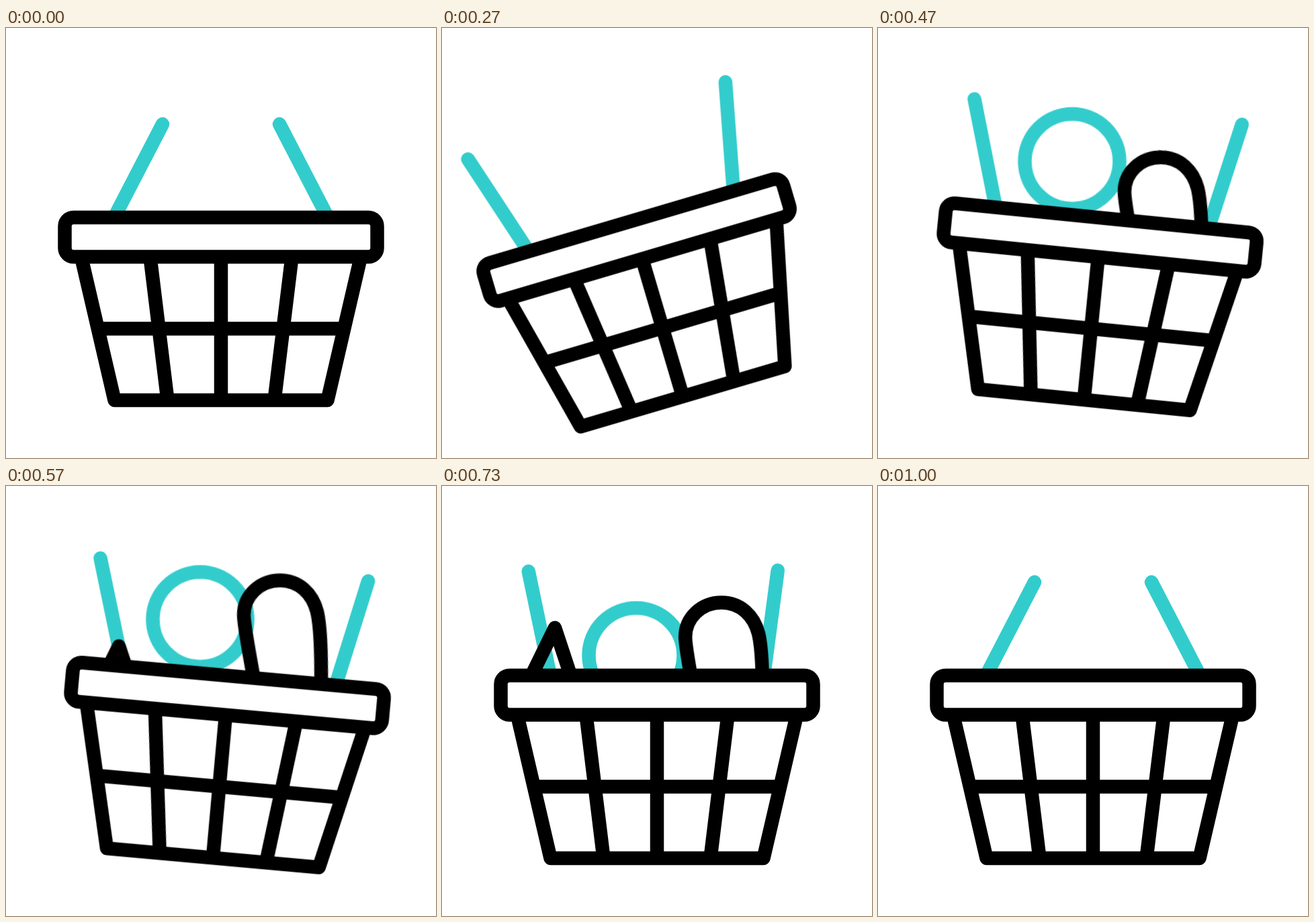
An HTML page without scripts that plays this animation: 640 px wide and 640 px high, repeating every 1.67 s.

```html
<!DOCTYPE html>
<html lang="en">
<head>
<meta charset="utf-8">
<title>Shopping basket</title>
<style>
  html, body { margin: 0; width: 100%; height: 100%; overflow: hidden; background: #fff; }
  svg { display: block; width: 100vw; height: 100vh; }

  .line { fill: none; stroke: #000; stroke-width: 20.5; stroke-linecap: round; stroke-linejoin: round; }
  .teal { stroke: #3cc; }

  .tilt, .level, .handle, .item {
    animation: 1670ms cubic-bezier(.333, 0, .667, 1) infinite;
  }
  .tilt, .level { transform-origin: 320px 418.5px; }
  .tilt { animation-name: tilt; }
  .level { animation-name: level; }
  .left { animation-name: left; }
  .right { animation-name: right; }
  .ball { animation-name: ball; }
  .pear { animation-name: pear; }
  .cone { animation-name: cone; }

  @keyframes tilt {
    0%, 41.6%, 100% { transform: rotate(0deg); }
    14.97% { transform: rotate(-16.9deg); }
    30.4% { transform: rotate(7deg); }
  }
  /* cancels the tilt so the goods move upright */
  @keyframes level {
    0%, 41.6%, 100% { transform: rotate(0deg); }
    14.97% { transform: rotate(16.9deg); }
    30.4% { transform: rotate(-7deg); }
  }
  @keyframes left {
    0%, 3.4%, 59.1%, 100% { d: path("M161 282L233 143"); }
    15.1%, 39.34% { d: path("M161 282L113.4 124.7"); }
  }
  @keyframes right {
    0%, 3.4%, 59.1%, 100% { d: path("M479 282L407 143"); }
    15.1%, 39.34% { d: path("M479 282L513.4 123"); }
  }
  @keyframes ball {
    0%, 14.13% { transform: translate(13px, 236px); }
    27.43%, 39.34% { transform: translate(0, 0); }
    53.71%, 100% { transform: translate(0, 236px); }
  }
  @keyframes pear {
    0%, 20.36%, 53.71%, 100% { transform: translate(36px, 145px); }
    33.53%, 39.34% { transform: translate(0, 0); }
  }
  @keyframes cone {
    0%, 28.3%, 53.71%, 100% { transform: translate(0, 150px); }
    38.8%, 39.34% { transform: translate(0, 0); }
  }
</style>
</head>
<body>
<svg viewBox="0 0 640 640">
  <clipPath id="above"><rect x="-200" y="-300" width="1040" height="582"/></clipPath>

  <g class="tilt line">
    <path class="handle left teal" d="M161 282L233 143"/>
    <path class="handle right teal" d="M479 282L407 143"/>

    <g clip-path="url(#above)">
      <g class="level">
        <circle class="item ball teal" cx="289" cy="198.5" r="70.5"/>
        <path class="item pear" d="M371 300C366 268 354 210 354 192C354 163 378 140.5 408 140.5C436 140.5 456 160 463 187C468 208 469.5 250 469 300"/>
        <path class="item cone" d="M111.6 292L168 177L206 292"/>
      </g>
    </g>

    <path d="M112 341L161.5 554H478.5L528 341M140 447.5H500M214.5 341L240.5 554M320 341V554M425.5 341L399.5 554"/>
    <rect x="87.5" y="282" width="465" height="58.5" rx="13" fill="#fff"/>
  </g>
</svg>
</body>
</html>
```
